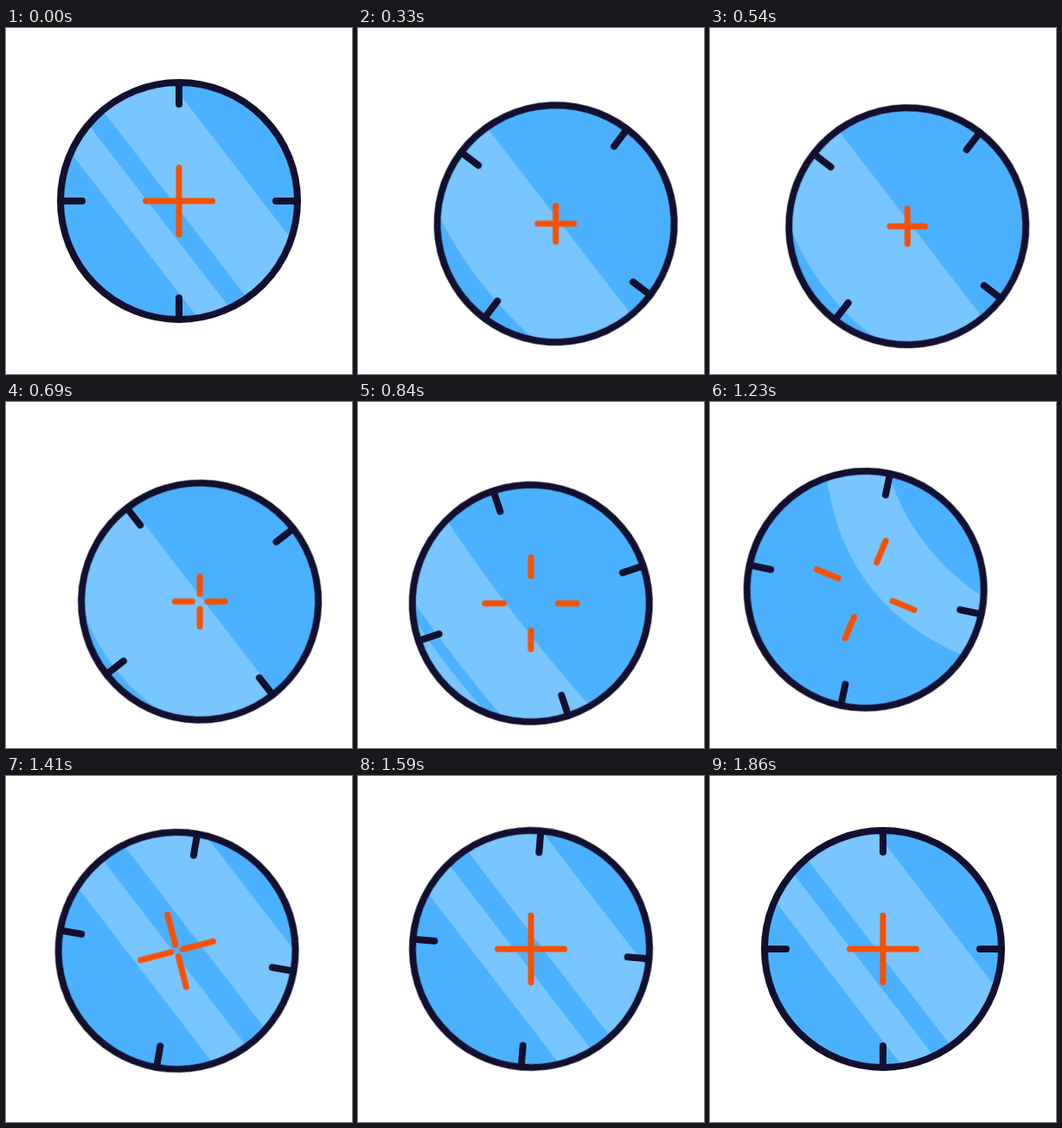
Recreate the animation shown at these times as an HTML page without scripts. Size 400 by 400 pixels, loop 2420 ms.

```html
<!DOCTYPE html>
<html lang="en">
<head>
<meta charset="utf-8">
<title>Crosshair</title>
<style>
html, body { margin: 0; width: 100%; height: 100%; overflow: hidden; background: #fff; }
svg { display: block; width: 100%; height: 100%; }

.scope, .ticks, .cross, .arm, .wide, .narrow {
  animation: 2420ms infinite both;
  animation-timing-function: cubic-bezier(.37, 0, .63, 1);
}
.scope  { animation-name: drift; }
.ticks  { animation-name: swing; fill: none; stroke: #12102f; stroke-width: 8; stroke-linecap: round; }
.cross  { animation-name: spin; fill: none; stroke: #f75000; stroke-width: 7; stroke-linecap: round; }
.arm    { animation-name: spread; }
.wide   { animation-name: wide; }
.narrow { animation-name: narrow; }
.shine  { fill: #78c5ff; }

@keyframes drift {
  0% { transform: translate(200px, 200px); animation-timing-function: cubic-bezier(.37, 0, .5, 1); }
  13.64% { transform: translate(228.6px, 226.2px); animation-timing-function: linear; }
  22.31% { transform: translate(228.2px, 229.2px); animation-timing-function: cubic-bezier(.5, 0, .85, .6); }
  28.51% { transform: translate(224.2px, 230.6px); animation-timing-function: cubic-bezier(.45, .2, .7, .65); }
  34.71% { transform: translate(200px, 232.8px); animation-timing-function: cubic-bezier(.3, .35, .55, .8); }
  40.91% { transform: translate(176.5px, 229.3px); animation-timing-function: cubic-bezier(.2, .5, .6, 1); }
  44.63% { transform: translate(171.7px, 226.8px); animation-timing-function: cubic-bezier(.45, 0, .75, .6); }
  50.83% { transform: translate(179.6px, 217px); animation-timing-function: cubic-bezier(.3, .4, .55, 1); }
  61.98%, 100% { transform: translate(200px, 200px); }
}

@keyframes swing {
  0% { transform: rotate(0deg); }
  16.53% { transform: rotate(-57deg); animation-timing-function: cubic-bezier(.37, 0, .6, 1); }
  51.24% { transform: rotate(12deg); }
  76.86%, 100% { transform: rotate(0deg); }
}

@keyframes spin {
  0%, 44.63% { transform: rotate(0deg); }
  63.22%, 100% { transform: rotate(90deg); }
}

@keyframes spread {
  0% { d: path("M0 -38.5L0 0"); }
  16.53% { d: path("M0 -19.5L0 0"); }
  21.07% { d: path("M0 -20L0 0"); animation-timing-function: cubic-bezier(.5, 0, .8, .6); }
  28.51% { d: path("M0 -28.7L0 -8.7"); animation-timing-function: cubic-bezier(.4, .3, .55, 1); }
  40.91% { d: path("M0 -66.5L0 -44"); }
  44.63% { d: path("M0 -67L0 -44.5"); animation-timing-function: cubic-bezier(.45, 0, .8, .65); }
  50.83% { d: path("M0 -61L0 -34.2"); animation-timing-function: cubic-bezier(.3, .35, .6, 1); }
  63.22%, 100% { d: path("M0 -38.5L0 0"); }
}

/* Glare bands, drawn along their own slanted axis */
@keyframes wide {
  0% { d: path("M-160 -76Q0 -76 160 -76L160 6Q0 6 -160 6Z"); }
  13.64% { d: path("M-160 -5Q0 -5 160 -5L160 77Q0 77 -160 77Z"); }
  28.51% { d: path("M-160 -4Q0 -4 160 -4L160 80Q0 80 -160 80Z"); animation-timing-function: cubic-bezier(.45, 0, .75, .75); }
  40.91% { d: path("M-160 61Q0 103 160 61L160 150Q0 190 -160 150Z"); animation-timing-function: linear; }
  44.63% { d: path("M-160 115Q0 190 160 115L160 220Q0 260 -160 220Z"); animation-timing-function: step-end; }
  44.8% { d: path("M-160 -300Q0 -200 160 -300L160 -210Q0 -130 -160 -210Z"); animation-timing-function: cubic-bezier(.3, .2, .6, 1); }
  50.83% { d: path("M-160 -137Q0 -37 160 -137L160 -80Q0 20 -160 -80Z"); }
  54.55% { d: path("M-160 -110Q0 -110 160 -110L160 -28Q0 -28 -160 -28Z"); }
  76.86%, 100% { d: path("M-160 -76Q0 -76 160 -76L160 6Q0 6 -160 6Z"); }
}

@keyframes narrow {
  0% { d: path("M-160 29Q0 29 160 29L160 65Q0 65 -160 65Z"); }
  13.64% { d: path("M-160 60Q0 70 160 60L160 83Q0 137 -160 83Z"); }
  28.51% { d: path("M-160 60Q0 80 160 60L160 72Q0 178 -160 72Z"); }
  40.91% { d: path("M-160 150Q0 190 160 150L160 190Q0 230 -160 190Z"); }
  44.63% { d: path("M-160 190Q0 230 160 190L160 230Q0 270 -160 230Z"); animation-timing-function: step-end; }
  44.8% { d: path("M-160 -260Q0 -140 160 -260L160 -220Q0 -60 -160 -220Z"); animation-timing-function: cubic-bezier(.3, .2, .7, .8); }
  50.83% { d: path("M-160 -110Q0 0 160 -110L160 -64Q0 50 -160 -64Z"); animation-timing-function: cubic-bezier(.3, .4, .6, 1); }
  54.55% { d: path("M-160 2Q0 2 160 2L160 45Q0 45 -160 45Z"); }
  76.86%, 100% { d: path("M-160 29Q0 29 160 29L160 65Q0 65 -160 65Z"); }
}
</style>
</head>
<body>
<svg viewBox="0 0 400 400">
  <defs>
    <clipPath id="lens"><circle r="136"/></clipPath>
  </defs>
  <g class="scope">
    <circle r="137" fill="#4bb1ff"/>
    <g clip-path="url(#lens)">
      <g class="shine" transform="rotate(52.4)">
        <path class="narrow" d="M-160 29Q0 29 160 29L160 65Q0 65 -160 65Z"/>
        <path class="wide" d="M-160 -76Q0 -76 160 -76L160 6Q0 6 -160 6Z"/>
      </g>
    </g>
    <g class="ticks">
      <circle r="137"/>
      <path d="M0-136V-112M136 0H112M0 136V112M-136 0H-112"/>
    </g>
    <g class="cross">
      <path class="arm" d="M0 -38.5L0 0"/>
      <g transform="rotate(90)"><path class="arm" d="M0 -38.5L0 0"/></g>
      <g transform="rotate(180)"><path class="arm" d="M0 -38.5L0 0"/></g>
      <g transform="rotate(270)"><path class="arm" d="M0 -38.5L0 0"/></g>
    </g>
  </g>
</svg>
</body>
</html>
```
